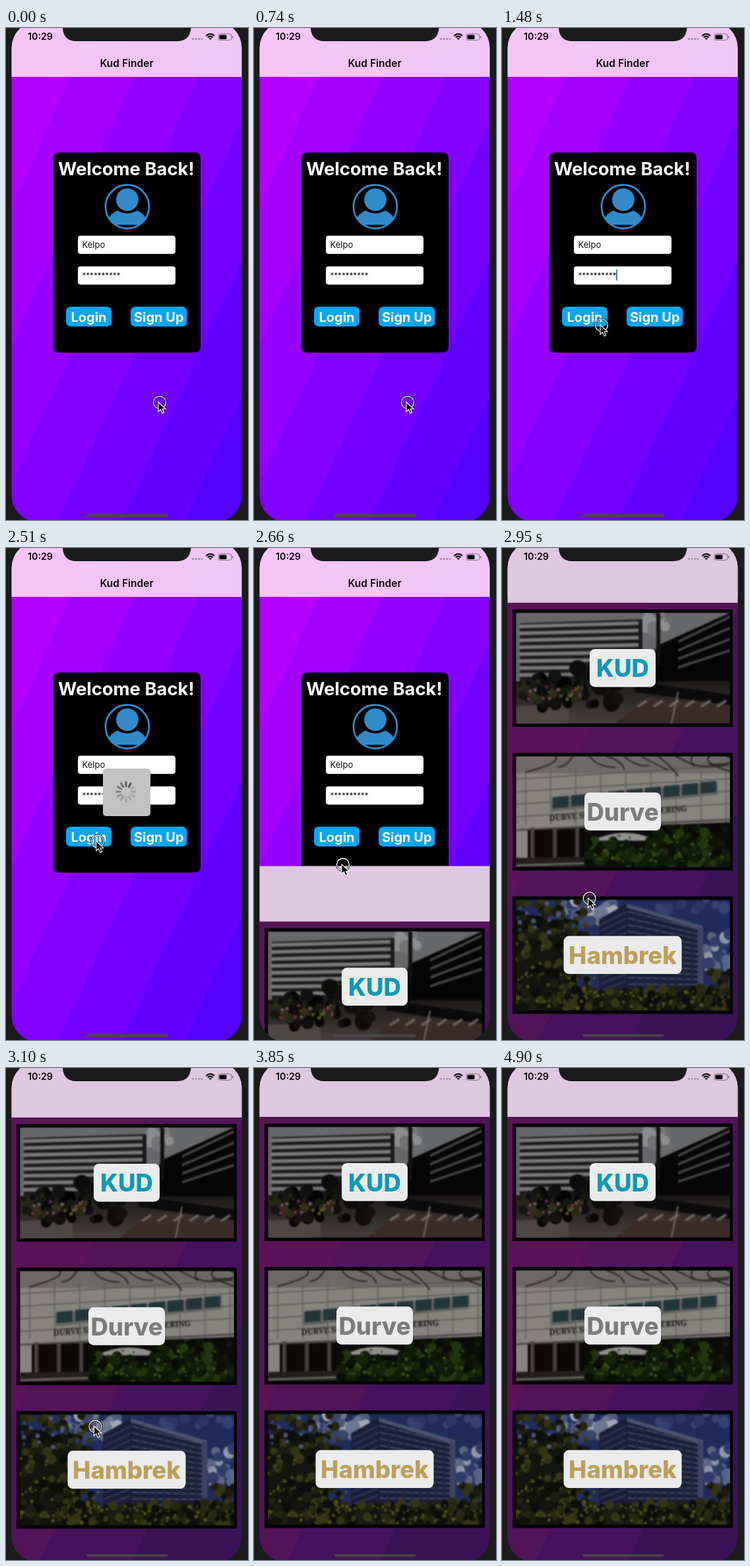
Recreate the animation shown at these times as an HTML page. Size 367x745 px, loop 5050 ms.

```html
<!DOCTYPE html>
<html lang="en">
<head>
<meta charset="utf-8">
<title>Sign in</title>
<style>
  html, body { margin: 0; width: 100%; height: 100%; overflow: hidden; background: #1b1b1b; }
  svg { display: block; width: 100%; height: 100%; font-family: Inter, "Open Sans", sans-serif; }
</style>
</head>
<body>
<svg id="stage" viewBox="0 0 367 745"></svg>
<script>
const LOOP = 5050, STEP = 148;
const stage = document.getElementById('stage');

const rect = (x, y, w, h, fill, r = 0, extra = '') =>
  `<rect x="${x}" y="${y}" width="${w}" height="${h}" rx="${r}" fill="${fill}" ${extra}/>`;
const disc = (x, y, r, fill) => `<circle cx="${x}" cy="${y}" r="${r}" fill="${fill}"/>`;
const shape = (d, fill) => `<path d="${d}" fill="${fill}"/>`;
const line = (d, stroke, w) => `<path d="${d}" fill="none" stroke="${stroke}" stroke-width="${w}"/>`;
const text = (s, x, y, size, weight, fill, anchor = 'middle') =>
  `<text x="${x}" y="${y}" font-size="${size}" font-weight="${weight}" fill="${fill}" text-anchor="${anchor}">${s}</text>`;
const many = (n, fn) => Array.from({ length: n }, (_, i) => fn(i)).join('');

// Slanted strip from (x0, y0) to (x1, y1), h high
const strip = (x0, y0, x1, y1, h, fill) => shape(`M${x0} ${y0}L${x1} ${y1}v${h}L${x0} ${y0 + h}Z`, fill);
// Stack of strips in perspective: gap0 and gap1 are the floor heights at each end
const floors = (n, x0, y0, gap0, x1, y1, gap1, h, fill) =>
  many(n, i => strip(x0, y0 + i * gap0, x1, y1 + i * gap1, h, fill));

let seed = 7;
const rnd = (a, b) => {
  seed = (seed * 16807) % 2147483647;
  return +(a + (b - a) * seed / 2147483647).toFixed(1);
};
const blobs = (n, x, y, w, h, r, fills) =>
  many(n, i => disc(rnd(x, x + w), rnd(y, y + h), rnd(r / 2, r), fills[i % fills.length]));

// Diagonal gradient made of flat bands of equal width
const bands = (id, first, width, colours) => {
  const stops = colours.map((c, i) => {
    const from = i ? first + (i - 1) * width : 0;
    const to = i < colours.length - 1 ? first + i * width : 1;
    return `<stop offset="${from}" stop-color="${c}"/><stop offset="${to}" stop-color="${c}"/>`;
  });
  return `<linearGradient id="${id}" x1="0" y1="0" x2="1" y2="1">${stops.join('')}</linearGradient>`;
};
const violets = Array.from({ length: 7 }, (_, i) => `rgb(${180 - i * 16.4},0,255)`);

const defs = `<defs>
  ${bands('violet', .185, .138, violets)}
  ${bands('plum', .36, .2, ['#5a1458', '#53145a', '#47125c', '#3b1256'])}
  <linearGradient id="bar"><stop stop-color="#f7c6f7"/><stop offset="1" stop-color="#f0c6f8"/></linearGradient>
  <linearGradient id="plaza" x2="0" y2="1"><stop stop-color="#1c1918"/><stop offset="1" stop-color="#47403e"/></linearGradient>
  <clipPath id="screen"><rect x="8.5" y="-10" width="349" height="758" rx="40"/></clipPath>
  <clipPath id="photo"><rect width="325" height="168"/></clipPath>
  <clipPath id="ring"><circle cx="184" cy="270.5" r="33"/></clipPath>
  <filter id="soft" x="-5%" y="-5%" width="110%" height="110%" color-interpolation-filters="sRGB"><feGaussianBlur stdDeviation="1.3"/></filter>
</defs>`;

const backdrop = (fill, bar) => rect(8, -10, 350, 758, fill) + rect(8, -10, 350, 84, bar);
const field = y => rect(109, y, 148, 27.5, '#fff', 4);
const button = (label, x, w) =>
  rect(x, 422, w, 30, '#05a6fb', 7) + text(label, x + w / 2, 444.5, 20, 700, '#fff');

const login = backdrop('url(#violet)', 'url(#bar)') +
  text('Kud Finder', 183, 59, 15.5, 600, '#0b060c') +
  rect(72, 188.5, 223, 303, '#000', 8) +
  text('Welcome Back!', 182.3, 223, 27.4, 700, '#fff') +
  `<g clip-path="url(#ring)">${shape('M150 298Q157 281 169 276.5Q184 285 199 276.5Q211 281 218 298Z', '#3489c9')}</g>` +
  disc(184, 260, 17, '#3489c9') +
  '<circle cx="184" cy="270.5" r="33" fill="none" stroke="#3489c9" stroke-width="2.8"/>' +
  field(314.5) + field(361) +
  text('Kelpo', 115.5, 332.5, 13, 400, '#111', 'start') +
  text('**********', 115.5, 379, 11.6, 400, '#111', 'start') +
  button('Login', 91, 69) + button('Sign Up', 189, 85.5) +
  rect(173, 365.5, 1.8, 17, '#4468d4', .8, 'id="caret"');

// Photos, each 325 by 168
const plazaPhoto = () => rect(0, 0, 325, 168, '#66686a') +
  blobs(14, 180, 0, 50, 30, 9, ['#8b8d8e', '#707274']) +
  strip(6, 16, 192, 10, 96, '#1b1b1c') +
  floors(8, 6, 18, 10.5, 186, 13, 11, 5.5, '#797876') +
  shape('M192 104L214 50L325 0V126Z', '#050505') +
  floors(4, 246, 42, 13, 325, 4, 17, 4, '#444546') +
  rect(213, 0, 6, 80, '#111') +
  rect(0, 104, 325, 64, 'url(#plaza)') +
  strip(180, 104, 325, 124, 16, '#0a0a0a') +
  shape('M150 168L200 128L325 142V168Z', '#3b2c2a') +
  many(6, i => line(`M${185 + i * 24} 142l14 -9`, '#6a6361', 4)) +
  line('M236 168L246 120', '#77706d', 2) +
  strip(0, 142, 80, 138, 30, '#4d4744') +
  blobs(36, 30, 84, 130, 60, 13, ['#050505', '#0d0c0b', '#121110']) +
  blobs(44, 2, 104, 100, 28, 7, ['#14180c', '#262a14', '#0c0c0a', '#33301c']) +
  blobs(20, 10, 112, 92, 20, 3, ['#6b3046', '#5c5c28', '#705860']);

const leaves = ['#0c1505', '#16240a', '#080d03', '#22360e', '#111c07'];
const schoolPhoto = () => rect(0, 0, 325, 168, '#85837e') +
  strip(0, 0, 325, 0, 26, '#6b6a66') +
  floors(4, 0, 34, 19, 325, 14, 19, 1.5, '#55534f') +
  many(9, i => rect(14 + i * 38, 18, 1.5, 86, '#5c5a56')) +
  floors(1, 54, 64, 0, 306, 38, 0, 20, '#64625e') +
  many(9, i => strip(56 + i * 28, 62 - i * 2.8, 80 + i * 28, 60 - i * 2.8, 17, '#22363a')) +
  line('M0 112L325 96', '#4c4a46', 3) +
  strip(18, 112, 325, 100, 50, '#0b0a09') +
  many(3, i => rect(22 + i * 34, 108, 6, 46, '#45423e')) +
  `<text transform="translate(51 98) rotate(-4)" font-family="'Noto Serif',serif" font-size="12" font-weight="700" fill="#151412">DURVE SCHOOL OF ENGINEERING</text>` +
  strip(0, 154, 130, 152, 16, '#22201e') + strip(0, 164, 125, 160, 3, '#6a6762') +
  shape('M115 128Q165 104 215 128Z', '#8f8f8c') +
  many(11, i => line(`M${60 + i * 26} 0q${rnd(-20, 30)} ${rnd(8, 22)} ${rnd(-50, 60)} ${rnd(12, 32)}`, '#26221e', 2)) +
  rect(112, 140, 213, 28, '#0c1505') +
  blobs(120, 108, 128, 217, 40, 8, leaves) +
  blobs(60, 210, 108, 115, 40, 8, leaves) +
  blobs(36, 120, 120, 200, 40, 3, ['#36521a', '#2c4515']);

const greens = ['#0f120a', '#1a1d0f', '#26290f', '#0a0c07', '#353616'];
const towerPhoto = () => rect(0, 0, 325, 168, '#212c5c') +
  blobs(34, 70, 0, 80, 40, 11, ['#6c7690', '#39446c', '#a2a7b4', '#4d587b']) +
  blobs(26, 284, 48, 41, 64, 10, ['#5a6583', '#2f3b69', '#8e95a8']) +
  blobs(14, 215, 0, 110, 20, 10, ['#2b3768', '#354173']) +
  shape('M126 30L168 6L284 40V150H126Z', '#1a1e38') +
  floors(14, 170, 17, 10, 283, 45, 7.5, 2, '#474e6c') +
  floors(11, 128, 37, 10, 168, 17, 10.5, 2, '#363d5c') +
  many(9, i => rect(182 + i * 12, 20 + i * 3.4, 2.5, 130, '#20253f')) +
  strip(168, 6, 284, 40, 6, '#4c536f') + rect(276, 42, 8, 106, '#3d4462') +
  rect(0, 140, 325, 28, '#16180c') + rect(0, 30, 92, 138, '#12150b') +
  blobs(170, 0, 2, 108, 166, 8, greens) +
  blobs(22, 6, 4, 96, 50, 4, ['#4c577c', '#2c3866']) +
  blobs(130, 80, 134, 245, 34, 8, greens) +
  blobs(40, 286, 108, 39, 50, 7, greens) +
  blobs(50, 0, 60, 120, 105, 3, ['#55521f', '#45451c']) +
  blobs(40, 90, 138, 235, 28, 3, ['#55521f', '#45451c']);

const card = (i, photo, label, w, fill) => {
  const y = 84 + i * 217.3, mid = 183;
  return rect(16, y, 334, 178, '#040304') +
    `<g transform="translate(21 ${y + 5})" clip-path="url(#photo)"><g filter="url(#soft)">${photo()}</g></g>` +
    rect(mid - w / 2, y + 60, w, 57.5, '#ebebeb', 8) +
    text(label, mid, y + 102.5, 36.5, 800, fill);
};

const list = `<g id="list">${backdrop('url(#plum)', '#dfc7df')}` +
  card(0, plazaPhoto, 'KUD', 100, '#0c98b5') +
  card(1, schoolPhoto, 'Durve', 116, '#7c7c7c') +
  card(2, towerPhoto, 'Hambrek', 179, '#bc9f59') + '</g>';

const loader = `<g id="loader">${rect(147, 334, 72, 72, '#c2c2c2', 5)}<g transform="translate(182 369)">` +
  many(12, i => `<rect class="spoke" x="-1.5" y="-16" width="3" height="9" rx="1.5" transform="rotate(${i * 30})"/>`) + '</g></g>';

const wifiArc = i => {
  const r = 2 + i * 3.4, d = r * .72;
  return line(`M${309.8 - d} ${18.2 - d}A${r} ${r} 0 0 1 ${309.8 + d} ${18.2 - d}`, '#0b060c', 2.1);
};
const chrome = shape('M86 0Q87 20 107 20H259Q279 20 280.5 0Z', '#1b1b1b') +
  text('10:29', 52, 18.3, 14.2, 600, '#0b060c') +
  many(4, i => disc(283.5 + i * 4.5, 16.7, 1.6, '#aa93ad')) + many(3, wifiArc) +
  rect(322, 9, 20, 9.5, 'none', 2.8, 'stroke="#7d6c80"') +
  rect(323.5, 10.5, 11, 6.5, '#0b060c', 1.4) + rect(343, 12, 1.4, 3.5, '#7d6c80', .7) +
  rect(121.5, 736, 124, 4.5, '#48464a', 2.2);

const cursor = '<g id="cursor"><g fill="none"><circle r="9.4" stroke="#000" stroke-width="2.6"/>' +
  '<circle r="9.4" stroke="#fff" stroke-width="1.3"/></g>' +
  '<path d="M-2 -.5V14L1.5 10.8L4 16.6L6.6 15.5L4.2 9.8H9Z" stroke="#fff" stroke-width="1.1"/></g>';

stage.innerHTML = defs + rect(0, 0, 367, 745, '#1b1b1b') +
  `<g clip-path="url(#screen)">${login}${loader}${list}${chrome}</g>${cursor}`;

const el = id => document.getElementById(id);
const spokes = [...stage.querySelectorAll('.spoke')];
const show = (node, on) => node.setAttribute('visibility', on ? 'visible' : 'hidden');

// Pointer moves: start ms, end ms, then where it goes
const origin = [233, 567];
const moves = [
  [890, 1480, 151, 450], [1480, 1780, 111, 444], [1780, 2080, 139, 443],
  [2510, 2810, 131, 514], [2810, 3100, 134, 546], [3100, 3700, 241, 315],
  [3850, 4440, 301, 688], [4440, 4740, 232, 737]
];
const pointer = ms => moves.reduce(([x, y], [from, to, nx, ny]) => {
  const u = Math.min(1, Math.max(0, (ms - from) / (to - from)));
  return [x + (nx - x) * u, y + (ny - y) * u];
}, origin);

function draw(ms) {
  // The picture advances in even steps
  const k = Math.min(33, Math.floor((ms % LOOP + 9) / STEP));
  const now = k * STEP;

  show(el('caret'), (k + 6) % 6.5 < 3.2);
  show(el('loader'), k >= 15 && k < 18);
  const lead = Math.floor(now * .012) + 7;
  spokes.forEach((s, i) => {
    const age = ((lead - i) % 12 + 12) % 12;
    const g = Math.min(168, 82 + age * 12);
    s.setAttribute('fill', `rgb(${g},${g},${g})`);
  });

  // Critically damped slide from the bottom edge
  const p = Math.max(0, (now - 2594) * .0176);
  show(el('list'), p > 0);
  el('list').setAttribute('transform', `translate(0 ${(755 * (1 + p) * Math.exp(-p)).toFixed(2)})`);

  show(el('cursor'), k < 26 || (k >= 30 && k < 33));
  el('cursor').setAttribute('transform', `translate(${pointer(now).map(v => v.toFixed(1))})`);
}

const start = performance.now();
const tick = () => {
  draw(performance.now() - start);
  requestAnimationFrame(tick);
};
tick();
</script>
</body>
</html>
```
